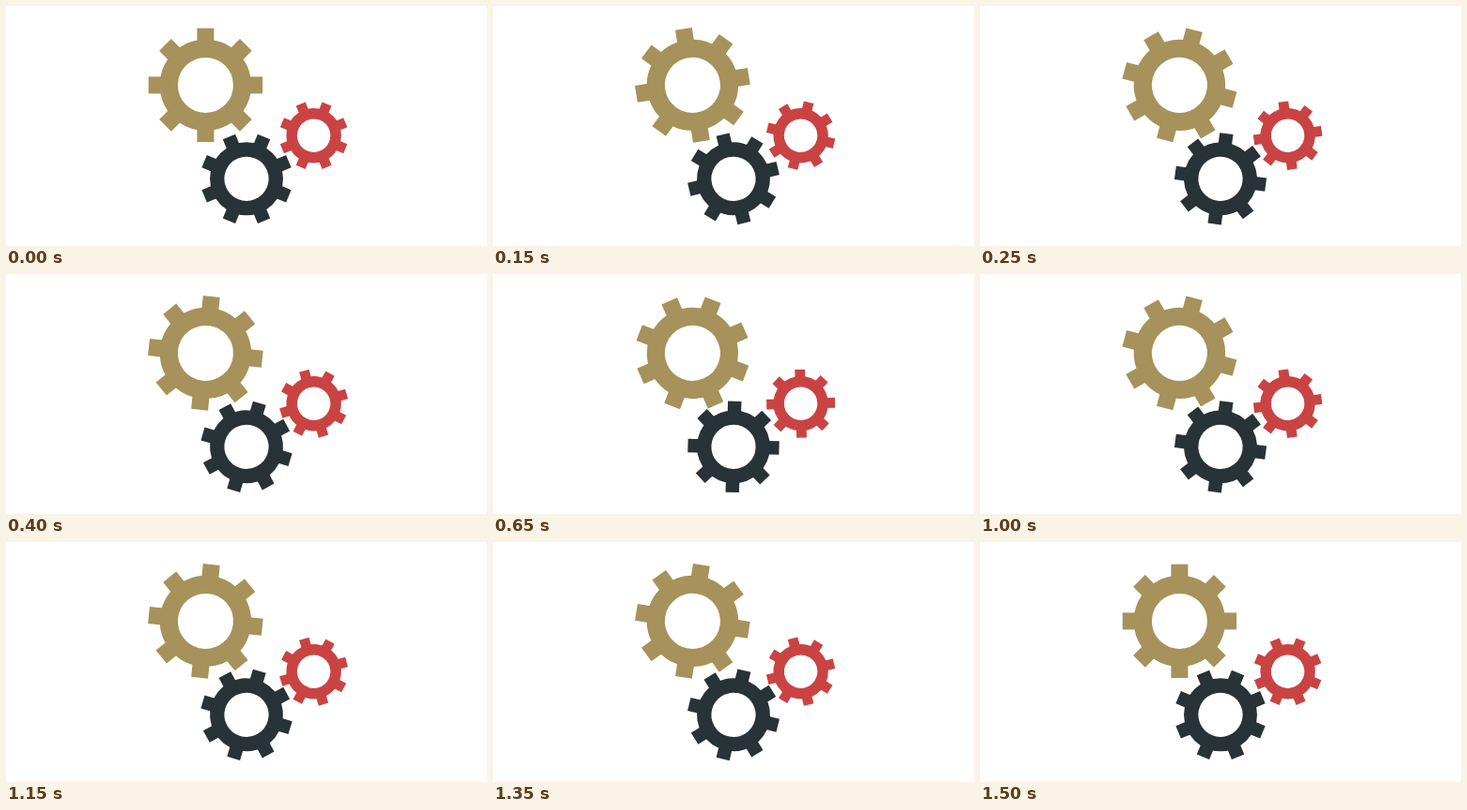
An HTML page with a canvas for the animation above (1550 ms loop, 512 by 256 pixels).

```html
<!DOCTYPE html>
<html lang="en">
<head>
<meta charset="utf-8">
<title>Turning gears</title>
<style>
  html, body { margin: 0; width: 100%; height: 100%; overflow: hidden; background: #fff; }
  canvas { display: block; }
</style>
</head>
<body>
<canvas id="stage" width="512" height="256"></canvas>
<script>
const ctx = document.getElementById('stage').getContext('2d');
const LOOP = 1550;
const STEP = 50;
const TURN = 12; // degrees per step
const TEETH = 8;

// Shared proportions at scale 1
const TIP = 60.7, BODY = 48.6, HOLE = 29.5, TOOTH = 18;

const gears = [
  { x: 212.4, y: 84.4, scale: 1, color: '#a6925a', start: 0, dir: 1 },
  { x: 256, y: 184.3, scale: 0.8, color: '#283337', start: 22.5, dir: -1 },
  { x: 327.6, y: 138.2, scale: 0.6, color: '#ca4343', start: 22.5, dir: 1 }
];

function drawGear({ x, y, scale, color, start, dir }, turned) {
  const middle = (BODY + HOLE) / 2;
  ctx.save();
  ctx.translate(x, y);
  ctx.scale(scale, scale);
  ctx.rotate((start + dir * turned) * Math.PI / 180);
  ctx.fillStyle = ctx.strokeStyle = color;

  ctx.lineWidth = BODY - HOLE;
  ctx.beginPath();
  ctx.arc(0, 0, middle, 0, Math.PI * 2);
  ctx.stroke();

  for (let i = 0; i < TEETH; i++) {
    ctx.fillRect(-TOOTH / 2, -TIP, TOOTH, TIP - middle);
    ctx.rotate(Math.PI * 2 / TEETH);
  }
  ctx.restore();
}

function render() {
  const step = Math.floor((performance.now() % LOOP) / STEP);
  ctx.fillStyle = '#fff';
  ctx.fillRect(0, 0, 512, 256);
  for (const gear of gears) drawGear(gear, step * TURN);
  requestAnimationFrame(render);
}

render();
</script>
</body>
</html>
```
